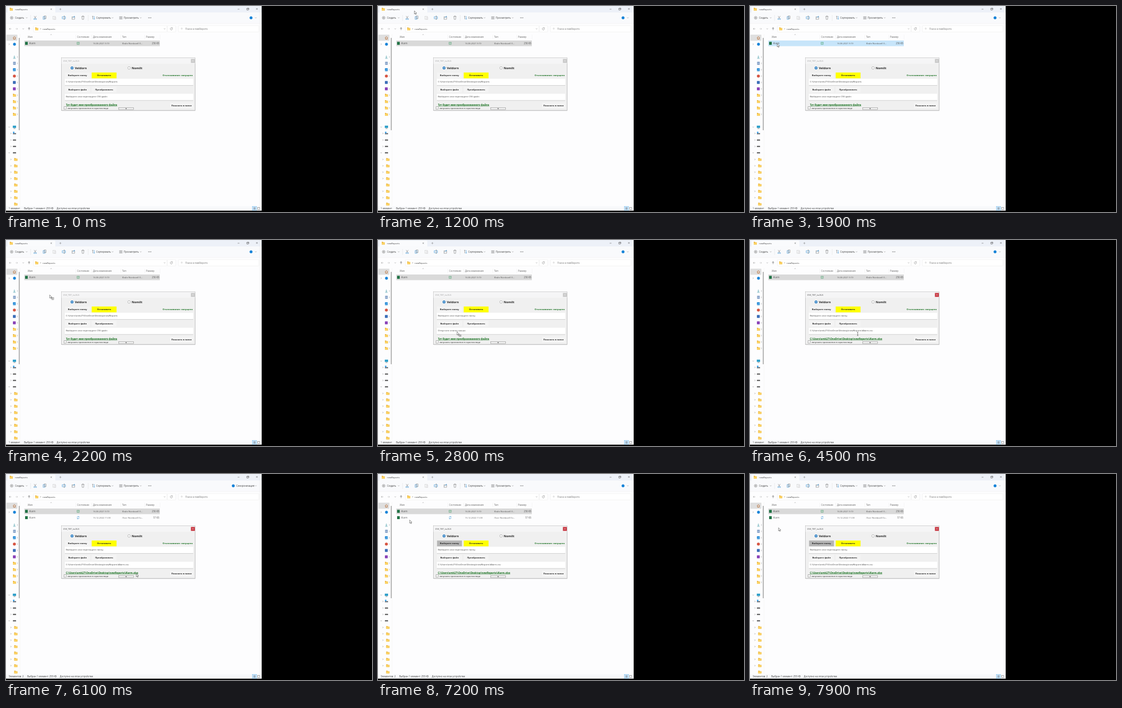
An HTML page that plays this animation: 690x388 px, repeating every 8000 ms.

```html
<!DOCTYPE html>
<html lang="ru">
<head>
<meta charset="utf-8">
<title>CSV_TXT_to.XLS</title>
<style>
html, body { margin: 0; width: 100%; height: 100%; overflow: hidden; background: #000; }
svg { display: block; width: 690px; height: 388px; }
text { font-family: "Open Sans", "Noto Sans", sans-serif; white-space: pre; }
</style>
</head>
<body>
<svg id="stage" viewBox="0 0 690 388" xmlns="http://www.w3.org/2000/svg"></svg>
<script>
const LOOP = 8000;
const INK = '#3c3c3c', SOFT = '#777', BLUE = '#2387cf', GREEN = '#17701f';
const HOME = 'C:\\Users\\omk27\\OneDrive\\Desktop\\newReports';
const PICK_FOLDER = 'Выберите или перетащите папку';
const PICK_FILE = 'Выберите или перетащите CSV файл';
const RELEASE = 'Отпустите кнопку мыши';

const rect = (x, y, w, h, fill, more = '') =>
  `<rect x="${x}" y="${y}" width="${w}" height="${h}" fill="${fill}" ${more}/>`;
const disc = (x, y, r, fill, more = '') =>
  `<circle cx="${x}" cy="${y}" r="${r}" fill="${fill}" ${more}/>`;
const line = (d, color = SOFT, width = .6) =>
  `<path d="${d}" fill="none" stroke="${color}" stroke-width="${width}"/>`;
// Text is placed by its vertical centre.
const label = (x, y, s, { size = 4.4, fill = INK, bold = false, end = false, mid = false, more = '' } = {}) =>
  `<text x="${x}" y="${y + size * .35}" font-size="${size}" fill="${fill}" font-weight="${bold ? 700 : 400}"` +
  ` text-anchor="${end ? 'end' : mid ? 'middle' : 'start'}" ${more}>${s}</text>`;
const group = (id, body) => `<g id="${id}">${body}</g>`;

const chevron = (x, y, dir = 'down') => line(dir === 'down'
  ? `M${x - 1.2} ${y - .6}l1.2 1.2 1.2-1.2` : `M${x - .6} ${y - 1.2}l1.2 1.2-1.2 1.2`);
const folder = (x, y) =>
  `<path d="M${x - 3} ${y - 2.5}h2.3l.8.9h2.9v4.1h-6z" fill="#e9ad2c"/>` + rect(x - 3, y - 1, 6, 3.5, '#fbd263');
const cross = (x, y, r, color, width) =>
  line(`M${x - r} ${y - r}l${2 * r} ${2 * r}m0 ${-2 * r}l${-2 * r} ${2 * r}`, color, width);
const outline = (x, y, w, h, color) => rect(x, y, w, h, 'none', `stroke="${color}" stroke-width=".6"`);
const syncIcon = (x, y) =>
  line(`M${x - 1.9} ${y - .3}a2 2 0 0 1 3.5-1.1v-1m0 1h-1M${x + 1.9} ${y + .3}a2 2 0 0 1-3.5 1.1v1m0-1h1`, BLUE, .7);

function tabBar() {
  return rect(0, 0, 482, 12.5, '#edf1f8') + rect(3, 1, 90, 12, '#fafbfd', 'rx="1.5"') +
    folder(10, 6) + label(17, 6, 'newReports', { size: 4.3 }) +
    cross(85.3, 6, 1.2, INK, .5) + line('M100.5 6h4m-2-2v4', SOFT, .5) +
    line('M436.7 6h3.4', INK, .5) + outline(454, 4.5, 3, 3, INK) +
    line('M455 4h3v3', INK, .4) + cross(473, 5.5, 1.5, INK, .5);
}

function toolbar() {
  const copy = outline(70, 20, 3.4, 5, BLUE) + outline(72, 18.8, 3.6, 5, SOFT);
  const paste = outline(88.5, 19.5, 4.5, 5.5, '#c9c9c9') + outline(91, 21.3, 3, 4, '#d5d5d5');
  const rename = outline(106, 20.2, 6, 3.8, BLUE) + line('M109.8 18.8v6.5m-1 0h2m-2-6.5h2', SOFT);
  const share = outline(124.5, 20.5, 5, 4.5, SOFT) + line('M126 22.5q.5-2.5 3.5-2.5m-1.4-1.3l1.4 1.3-1.4 1.3', BLUE);
  const trash = line('M142.3 19.8h5.4m-4.6 0l.5 5.4h2.8l.5-5.4m-2.8 0v-1h1.8v1');
  return rect(0, 12.5, 482, 20.5, '#f9fafc') + line('M0 33h482', '#e8e8ea', .5) +
    disc(10.7, 22.2, 2.6, 'none', 'stroke="#555" stroke-width=".5"') + line('M9.3 22.2h2.8m-1.4-1.4v2.8', INK, .5) +
    label(17, 22.2, 'Создать') + chevron(39, 22.2) + line('M46.3 17v11M155 17v11', '#dedede', .5) +
    line('M53 18.8l3.3 5m.7-5l-3.3 5', SOFT) +
    disc(53.4, 24.6, 1, 'none', `stroke="${BLUE}" stroke-width=".6"`) +
    disc(56.6, 24.6, 1, 'none', `stroke="${BLUE}" stroke-width=".6"`) +
    copy + paste + rename + share + trash +
    line('M163.5 25v-6m-1.3 1.2l1.3-1.3 1.3 1.3', SOFT) + line('M166.2 19v6m-1.3-1.2l1.3 1.3 1.3-1.3', BLUE) +
    label(170, 22.2, 'Сортировать') + chevron(201, 22.2) +
    line('M213.5 20.3h6m-6 2h6m-6 2h6', SOFT, .8) + label(222, 22.2, 'Просмотреть') + chevron(254, 22.2) +
    [268.8, 271, 273.2].map(x => disc(x, 22.2, .6, INK)).join('') + chevron(471, 22.2);
}

function addressBar() {
  const box = 'rx="1" stroke="#e7e7e7" stroke-width=".5"';
  return line('M10 43h-4m1.6-1.6l-1.6 1.6 1.6 1.6', '#999') +
    line('M18 43h4m-1.6-1.6l1.6 1.6-1.6 1.6', '#bbb') + chevron(32.5, 43) +
    line('M43.5 45.2v-4.4m-1.7 1.7l1.7-1.7 1.7 1.7', INK) +
    rect(51.5, 37, 252, 12, '#fff', box) + rect(304, 37, 16, 12, '#fff', box) + rect(325, 37, 152, 12, '#fff', box) +
    folder(58, 43) + chevron(65.3, 43, 'right') + label(69, 43, 'newReports', { size: 4.3 }) +
    chevron(299, 43) + line('M313.4 41.7a2.1 2.1 0 1 0 .5 1.5m-.2-2.7v1.5h-1.5', SOFT) +
    disc(331.3, 42.5, 1.2, 'none', 'stroke="#aaa" stroke-width=".5"') +
    label(338, 43, 'Поиск в newReports', { fill: SOFT });
}

function sidebar() {
  const square = (y, color) => rect(13, y - 2.7, 5.4, 5.4, color, 'rx=".6"');
  const disk = y => rect(13, y - .9, 6, 2, '#4b4b4b', 'rx=".4"');
  let out = rect(1, 54, 20.5, 11.5, '#dfdfdf', 'rx="1"') +
    line('M13.3 60l2.5-2.5 2.5 2.5m-4.2-.5v3h3.4v-3', '#b76b32', .9) +
    disc(16, 72, 2.7, '#1683d8') + chevron(6, 72, 'right') +
    line('M15.8 93.4v4m-1.5-1.5l1.5 1.5 1.5-1.5m-3.8 2.8h4.6', '#3f9aa6', .7) +
    rect(13.5, 105, 4.8, 5.8, '#7d9bc4') + line('M14.5 107h2.8m-2.8 1.7h2.8', '#fff', .5) +
    square(120, '#258bd6') + line('M13.3 122l2-2 1.2 1 1.6-1.6', '#d7efff', .7) +
    disc(15.8, 132, 2.8, '#d75543') + square(144, '#3d6fb9') + square(156, '#8a42b8');
  for (let y = 168; y <= 204; y += 12) out += folder(16, y);
  out += rect(12.8, 225.4, 6.2, 4.2, '#2a9dc8') + line('M14 231h4m-2-1.5v1.5') + chevron(6, 228) +
    rect(13, 239.5, 6, 2, '#59636b') + rect(13.2, 236.8, 2.6, 2.6, '#2b9bea') +
    disk(252.5) + disk(264.5) + disk(276.5) + chevron(6, 276.5);
  for (let i = 0; i < 8; i++) out += folder(18.5, 289 + i * 12);
  [240, 252.5, 264.5, 289, 301, 313, 325, 349, 361].forEach(y => out += chevron(9.3, y, 'right'));
  for (let y = 96; y <= 204; y += 12) out += line(`M21.6 ${y - 1.5}v3`, '#888', .5);
  return out + rect(24.3, 60, 1.3, 174, '#8f8f8f', 'rx=".6"') + line('M26.5 53v323', '#eee', .4);
}

function fileRow(y, date, kind, size, fill) {
  return rect(36, y - 2.8, 5, 5.6, '#217346') +
    label(43.5, y, 'Alarm', { fill }) + label(164, y, date, { size: 4.2, fill }) +
    label(219, y, kind, { size: 4.3, fill }) + label(289, y, size, { end: true, fill });
}

function files() {
  const head = [[41, 'Имя'], [134, 'Состояние'], [164, 'Дата изменения'], [219, 'Тип'], [264, 'Размер']];
  return head.map(([x, s]) => label(x, 58.3, s, { fill: '#666' })).join('') +
    line('M83.8 54.4l1.2-1 1.2 1', SOFT, .5) +
    line('M131.5 54v9M161.5 54v9M216.5 54v9M261.5 54v9M290.5 54v9', '#ececec', .5) +
    rect(34.5, 65, 255.5, 10.6, '#d9d9d9', 'id="selection"') +
    fileRow(70.3, '16.06.2021 9:19', 'Файл Nordavell E...', '256 КБ', '#555') +
    outline(134, 68.2, 4, 4, '#3b9b62') + line('M135 70.2l.8.8 1.5-1.7', '#3b9b62', .5) +
    group('newRow', fileRow(82.2, '15.12.2022 11:00', 'Лист Nordavell Ex...', '57 КБ', '#666') + syncIcon(136, 82.2));
}

function statusBar() {
  const tail = x => label(x, 381.3, 'Выбран 1 элемент: 255 КБ') +
    label(x + 61.5, 381.3, 'Доступно на этом устройстве');
  return rect(0, 377, 482, 8.3, '#f8f9fb') +
    group('oneItem', label(5, 381.3, '1 элемент') + tail(34)) +
    group('twoItems', label(5, 381.3, 'Элементов: 2') + tail(40)) +
    rect(464.5, 377.5, 8, 7.5, '#cce8ff', 'stroke="#6ab4e6" stroke-width=".5"') +
    line('M466.5 379.8h4m-4 1.6h4m-4 1.6h4', INK, .5) + outline(474.3, 379.3, 4.2, 4, SOFT);
}

function dialog() {
  const button = (id, x, y, w, text, fill = '#f4f4f4', h = 11) =>
    rect(x, y, w, h, fill, `id="${id}"`) + label(x + w / 2, y + h / 2, text, { size: 4.2, bold: true, fill: '#222', mid: true });
  const field = (id, y) => rect(111, y, 242, 12.6, '#fff') + line(`M111 ${y + 12.6}h242`, '#b5b5b5', .6) +
    label(113, y + 5.2, '', { size: 4.35, more: `id="${id}"` });
  return rect(104.8, 98.2, 252.5, 99.8, '#000', 'opacity=".1" rx="1"') +
    rect(104.4, 97.5, 252.2, 99.2, '#f0f0f0', 'stroke="#aaa" stroke-width=".6"') +
    rect(104.7, 97.8, 251.6, 11, '#f5f5f6') +
    label(107.7, 103.3, 'CSV_TXT_to.XLS', { size: 4.2, more: 'id="dialogTitle"' }) +
    rect(348.6, 99.7, 7.5, 7.5, '#c9c9c9', 'id="close"') + cross(352.4, 103.4, 1.1, '#fff', .6) +
    disc(124.5, 116.7, 2.6, '#126fbd') + disc(124.5, 116.7, 1.1, '#fff') +
    label(129.7, 116.7, 'Veldorn', { size: 5.8, bold: true, fill: '#222' }) +
    disc(232, 116.7, 2.4, '#fff', 'stroke="#777" stroke-width=".5"') +
    label(237, 116.7, 'Nomilt', { size: 5.8, bold: true, fill: '#222' }) +
    button('folderButton', 111.3, 125.3, 47, 'Выберите папку') +
    button('stopButton', 161.6, 125.3, 46.8, 'Остановить', '#ff0') +
    label(352, 130.8, 'Отслеживание: запущено', { size: 4.15, bold: true, fill: GREEN, end: true }) +
    field('folderField', 137) +
    button('fileButton', 111.3, 152, 47, 'Выберите файл') +
    button('convertButton', 161.6, 152, 46.8, 'Преобразовать') +
    field('fileField', 165.3) +
    label(113, 186, '', { size: 4.6, bold: true, fill: GREEN, more: 'id="result" text-decoration="underline"' }) +
    button('showButton', 309, 182, 44, 'Показать в папке') +
    rect(109.3, 189.8, 4.3, 4.3, '#fff', 'stroke="#666" stroke-width=".5"') +
    label(116, 192.2, 'запускать приложение в скрытом виде', { size: 4.05, fill: '#222' }) +
    rect(212.5, 191.6, 27.8, 3.4, '#f5f5f5', 'stroke="#888" stroke-width=".6"') +
    `<path d="M225 192.7h2.8l-1.4 1.5z" fill="#222"/>`;
}

const pointer = group('cursor',
  group('arrow', '<path d="M0 0v6l1.4-1.3 1 2.2 1-.4-1-2.2h1.9z" fill="#fff" stroke="#222" stroke-width=".5"/>') +
  group('badge', rect(4, 5.2, 3.6, 3.6, '#fff', 'stroke="#555" stroke-width=".5"') + line('M4.8 7h2m-1-1v2', '#444', .5)) +
  group('beam', line('M-1.2-3q1.2 0 1.2.7 0-.7 1.2-.7M0-2.3v5.2m-1.2.7q1.2 0 1.2-.7 0 .7 1.2.7', '#222', .6)));

const stage = document.getElementById('stage');
stage.innerHTML = rect(0, 0, 690, 388, '#000') + rect(0, 0, 482, 385.3, '#fdfdfe') +
  tabBar() + toolbar() + addressBar() + sidebar() + files() + statusBar() +
  group('cloudIdle', disc(462, 22.2, 2.7, '#1683d8')) +
  group('cloudBusy', disc(428.5, 22.2, 2.7, '#1683d8') + label(434, 22.2, 'Синхронизация')) +
  dialog() + pointer;

const el = id => document.getElementById(id);
const show = (id, on) => el(id).setAttribute('visibility', on ? 'visible' : 'hidden');
const paint = (id, fill) => el(id).setAttribute('fill', fill);
const write = (id, s) => { if (el(id).textContent !== s) el(id).textContent = s; };

// Pointer stops: time, x, y
const path = [
  [700, 84, 0], [900, 72, 4], [1100, 70, 4], [1700, 51.3, 71], [1900, 51.3, 71],
  [2700, 149, 173], [3000, 149, 173], [3800, 191.3, 157], [3900, 191.3, 157],
  [4200, 203, 176.5], [4600, 203, 176.5], [5500, 252, 192], [5700, 252, 192],
  [6100, 245.6, 187.5], [6500, 245.6, 187.5], [6900, 60, 86], [7100, 60, 86], [7900, 53.8, 101.2]
];

function pointerAt(t) {
  const next = path.findIndex(p => p[0] > t);
  if (next === 0) return path[0].slice(1);
  if (next < 0) return path[path.length - 1].slice(1);
  const [t0, x0, y0] = path[next - 1], [t1, x1, y1] = path[next];
  const u = (t - t0) / (t1 - t0), k = u * u * (3 - 2 * u);
  return [x0 + (x1 - x0) * k, y0 + (y1 - y0) * k];
}

function render(t) {
  const within = (a, b) => t >= a && t < b;
  const [x, y] = pointerAt(t);
  const beam = within(4100, 5000);
  el('cursor').setAttribute('transform', `translate(${x} ${y})`);
  show('arrow', t >= 700 && !beam);
  show('beam', beam);
  show('badge', within(2100, 3000));

  paint('selection', within(1500, 2100) ? '#c7e5fa' : '#d9d9d9');
  const active = t >= 3900;
  paint('dialogTitle', active ? '#333' : '#999');
  paint('close', active ? '#c83c46' : '#c9c9c9');
  paint('convertButton', within(3500, 4100) ? '#c2c2c2' : '#f4f4f4');
  paint('folderButton', t >= 6700 ? '#b5b5b5' : '#f4f4f4');

  write('folderField', t < 2300 ? HOME : t < 2450 ? RELEASE : PICK_FOLDER);
  write('fileField', t < 2550 ? PICK_FILE : t < 3000 ? RELEASE : HOME + '\\Alarm.csv');
  write('result', t < 4500 ? 'Тут будет имя преобразованного файла' : HOME + '\\Alarm.xlsx');

  const converted = t >= 5800, syncing = within(5900, 7200);
  show('newRow', converted);
  show('oneItem', !converted);
  show('twoItems', converted);
  show('cloudBusy', syncing);
  show('cloudIdle', !syncing);
}

const start = performance.now();
function tick() {
  render((performance.now() - start) % LOOP);
  requestAnimationFrame(tick);
}
tick();
</script>
</body>
</html>
```
